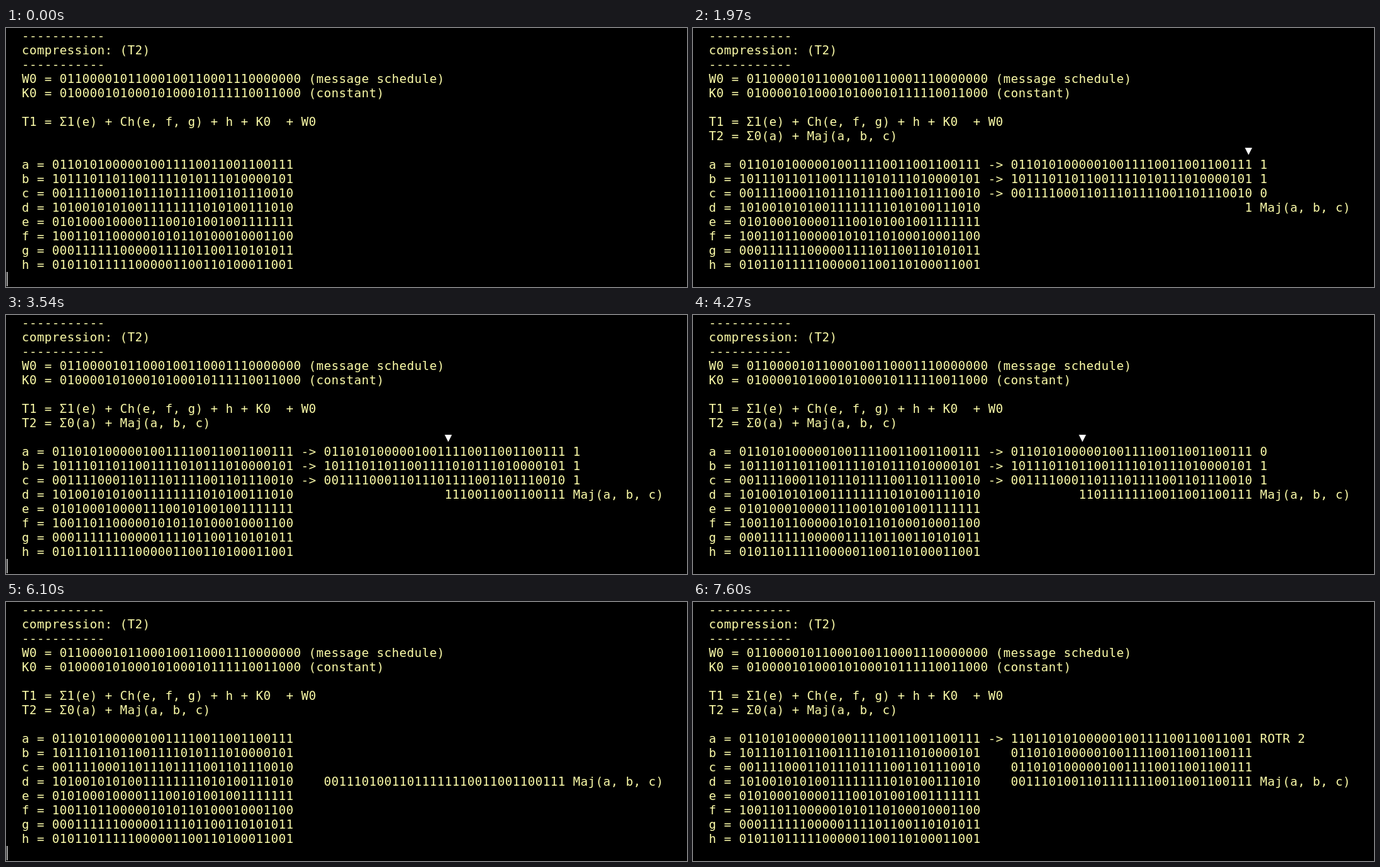
Animation of 902x344 px, one loop 8000 ms. Source, as an HTML page:

```html
<!DOCTYPE html>
<html lang="en">
<head>
<meta charset="utf-8">
<title>SHA-256 compression: T2</title>
<style>
  html, body { margin: 0; width: 100%; height: 100%; overflow: hidden; background: #000; }
  pre, #cursor { position: absolute; margin: 0; }
  pre {
    left: 1px; top: 1px;
    font: 16px/19px "DejaVu Sans Mono", monospace;
    letter-spacing: calc(10px - 1ch);
    color: #ffffaa;
  }
  #pointer { top: 153px; color: #fff; }
  #cursor { left: 1px; top: 324px; width: 1px; height: 19px; background: #fff; }
</style>
</head>
<body>
<pre id="screen"></pre>
<pre id="pointer">▼</pre>
<div id="cursor"></div>
<script>
const LOOP = 8000, COL = 10;
const $ = id => document.getElementById(id);
const bin = n => (n >>> 0).toString(2).padStart(32, '0');
const rotr = (n, k) => n >>> k | n << 32 - k;

const regs = [0x6a09e667, 0xbb67ae85, 0x3c6ef372, 0xa54ff53a,
              0x510e527f, 0x9b05688c, 0x1f83d9ab, 0x5be0cd19];
const [a, b, c] = regs;
const maj = bin(a & b ^ a & c ^ b & c);

// Runs of majority bits: [first bit, start time], then one bit per 100 ms.
const runs = [[1, 1970], [9, 2800], [13, 3240], [14, 3310], [21, 4040], [22, 4140], [23, 4270]];
const blinks = [370, 940, 1540, 2140, 2740, 3340, 3940, 4570, 5170, 5770, 6370, 6940, 7540];

function bitCount(t) {
  let count = 0;
  runs.forEach(([first, start], i) => {
    const last = i + 1 < runs.length ? runs[i + 1][0] - 1 : 32;
    if (t >= start) count = Math.min(last, first + Math.floor((t - start) / 100));
  });
  return count;
}

// Text to the right of register row i (0 = a).
function sideText(i, t, bits) {
  const row = (arrow, value = '', note = '') =>
    ` ${arrow ? '->' : '  '} ${value} ${note}`;
  if (i === 3) return bits ? row(false, maj.slice(32 - bits).padStart(32), 'Maj(a, b, c)') : '';
  if (i > 3) return '';
  if (t < 6100) {
    if (t < 1170) return '';
    const value = bin(regs[i]);
    return row(true, t >= 1570 ? value : '', bits && t < 5700 ? value[32 - bits] : '');
  }
  if (t < [6700, 6900, 7100][i]) return row(i === 0 && t >= 6500);
  const turn = i ? 0 : (t >= 7500) + (t >= 7600);
  return row(i === 0, bin(rotr(a, turn)), turn ? 'ROTR ' + turn : '');
}

function render(t) {
  const bits = bitCount(t);
  const lines = [
    '-----------',
    'compression: (T2)',
    '-----------',
    `W0 = ${bin(0x61626380)} (message schedule)`,
    `K0 = ${bin(0x428a2f98)} (constant)`,
    '',
    'T1 = Σ1(e) + Ch(e, f, g) + h + K0  + W0',
    (t >= 370 ? 'T2 = ' : '') + (t >= 770 ? 'Σ0(a) + Maj(a, b, c)' : ''),
    '',
    ...regs.map((r, i) => `${'abcdefgh'[i]} = ${bin(r)}${sideText(i, t, bits)}`)
  ];
  const text = lines.map(line => '  ' + line).join('\n');
  if ($('screen').textContent !== text) $('screen').textContent = text;

  $('pointer').style.left = 1 + COL * (74 - bits) + 'px';
  $('pointer').hidden = !bits || t >= 5700;
  $('cursor').hidden = blinks.filter(time => t >= time).length % 2 === 1;
}

const start = performance.now();
function tick() {
  render((performance.now() - start) % LOOP);
  requestAnimationFrame(tick);
}
render(0);
tick();
</script>
</body>
</html>
```
